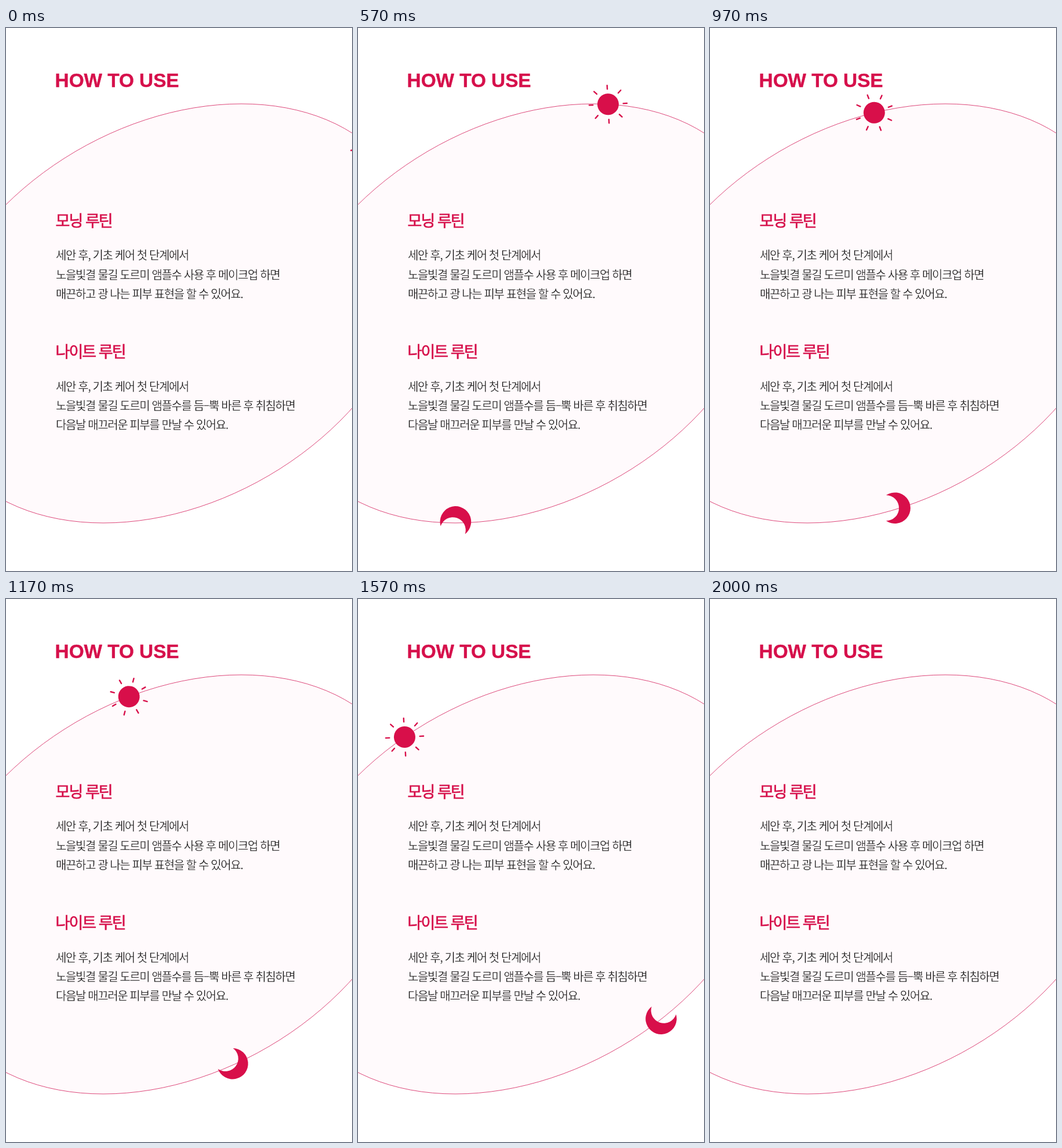
An HTML page that plays this animation: 597 by 938 pixels, repeating every 2.07 s.

```html
<!DOCTYPE html>
<html lang="ko">
<head>
<meta charset="utf-8">
<title>How to use</title>
<style>
  html, body { margin: 0; width: 100%; height: 100%; overflow: hidden; background: #fff; }
  svg { display: block; width: 597px; height: 938px; }
  .title { font: 700 33.3px "Liberation Sans", Arial, sans-serif; fill: #d6104b; stroke: #d6104b; stroke-width: .4; }
  .head, .body { font-family: "Noto Sans CJK KR", "Noto Sans CJK JP", "Noto Sans CJK", sans-serif; }
  .head { font-size: 27px; font-weight: 500; letter-spacing: -1.95px; fill: #d6104b; stroke: #d6104b; stroke-width: .7; }
  /* the background-coloured stroke thins the glyphs */
  .body { font-size: 20px; font-weight: 300; letter-spacing: -1.41px; fill: #111; stroke: #fffafc; stroke-width: .35; }
</style>
</head>
<body>
<svg viewBox="0 0 597 938" lang="ko">
  <!-- radii give only the ratio; the arcs scale up to span the two end points -->
  <path id="orbit" fill="#fffafc" stroke="#d8336a" stroke-width=".9"
    d="M406 131 A1.3918 1 -30 0 0 168 855 A1.3918 1 -30 0 0 406 131 Z"/>
  <text class="title" x="84.6" y="102">HOW TO USE</text>
  <text class="head" x="85.5" y="342.6">모닝 루틴</text>
  <g class="body">
    <text x="86" y="400.3">세안 후, 기초 케어 첫 단계에서</text>
    <text x="86" y="433.7">노을빛결 물길 도르미 앰플수 사용 후 메이크업 하면</text>
    <text x="86" y="467">매끈하고 광 나는 피부 표현을 할 수 있어요.</text>
  </g>
  <text class="head" x="85.5" y="569">나이트 루틴</text>
  <g class="body">
    <text x="86" y="626.5">세안 후, 기초 케어 첫 단계에서</text>
    <text x="86" y="660">노을빛결 물길 도르미 앰플수를 듬–뿍 바른 후 취침하면</text>
    <text x="86" y="693.3">다음날 매끄러운 피부를 만날 수 있어요.</text>
  </g>
  <g id="sun" fill="#d80f4a" stroke="#d80f4a" stroke-width="2.4" stroke-linecap="round">
    <circle r="18.5" stroke="none"/>
  </g>
  <!-- crescent opens towards +x -->
  <path id="moon" fill="#d80f4a" d="M15.2 -22.1 A26.8 26.8 0 1 0 15.2 22.1 A22.1 22.1 0 0 1 15.2 -22.1 Z"/>
</svg>
<script>
const LOOP = 2070, LAST = 60;
const byId = id => document.getElementById(id);
const orbit = byId('orbit'), sun = byId('sun'), moon = byId('moon');
const total = orbit.getTotalLength();

for (let i = 0; i < 8; i++) {
  const ray = document.createElementNS('http://www.w3.org/2000/svg', 'line');
  ray.setAttribute('y1', -26.2);
  ray.setAttribute('y2', -32.6);
  ray.setAttribute('transform', `rotate(${i * 45})`);
  sun.append(ray);
}

const at = s => orbit.getPointAtLength((s + total) % total);

// Puts a node at distance s on the orbit, moved inwards by inset.
function place(node, s, angle, inset = 0) {
  const p = at(s), a = at(s - 1), b = at(s + 1);
  const dx = b.x - a.x, dy = b.y - a.y, len = Math.hypot(dx, dy);
  const x = p.x + dy / len * inset, y = p.y - dx / len * inset;
  node.setAttribute('transform', `translate(${x} ${y}) rotate(${angle})`);
}

function draw(t) {
  // Motion runs at 30 steps a second, then holds.
  const k = Math.min(LAST, Math.floor(t * 0.03 + 0.1));
  place(sun, 49.2 + 12.45 * (k - 23), 6 * k - 60);
  place(moon, total / 2 + 77.3 + 12.82 * (k - 23), 6 * k + 6, 2.7 - 0.0055 * (k - 27) ** 2);
}

const start = performance.now();
function tick() {
  draw((performance.now() - start) % LOOP);
  requestAnimationFrame(tick);
}
tick();
</script>
</body>
</html>
```
